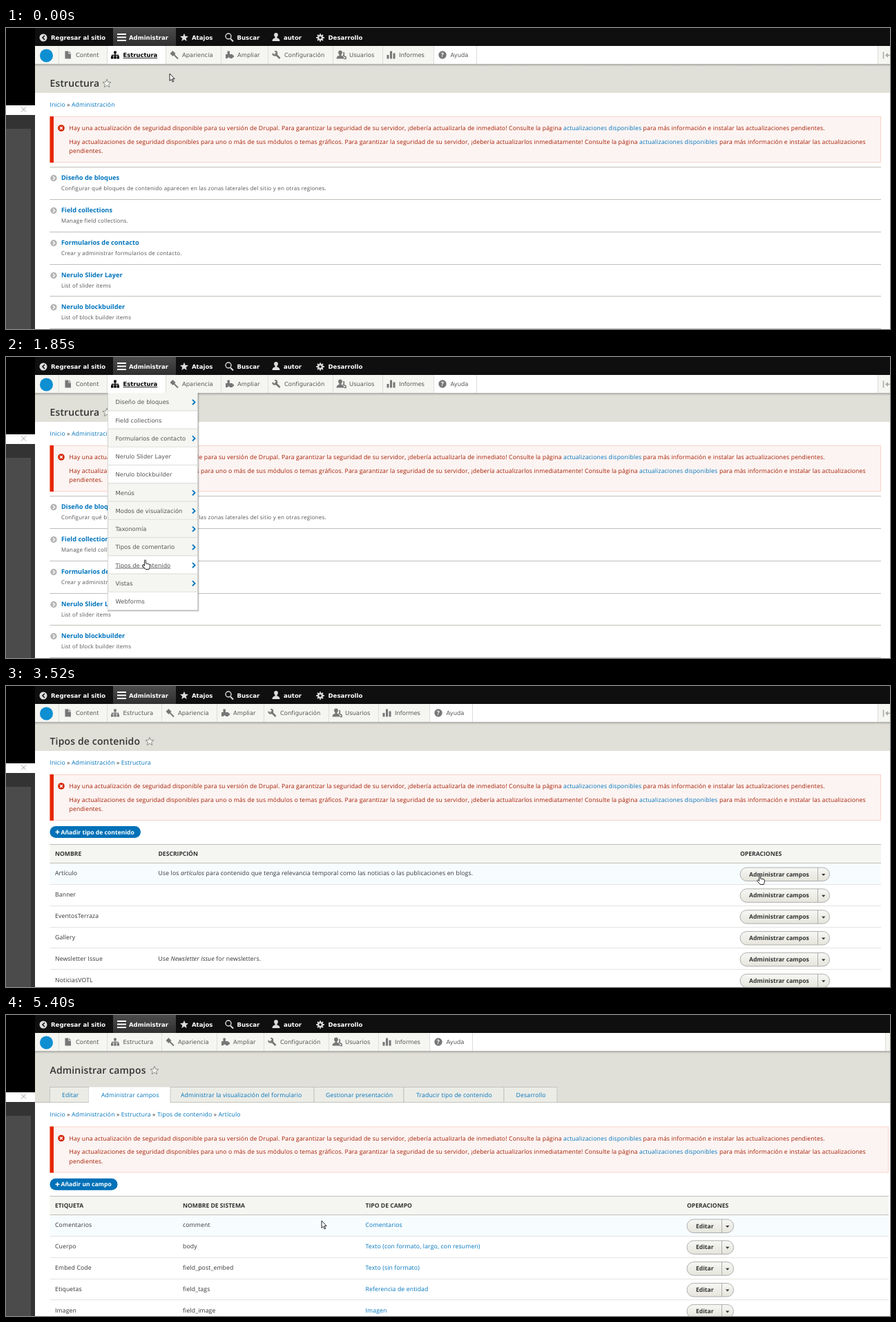
These frames come from a looping animation (1280 by 436 pixels, 5620 ms). An HTML page:

```html
<!DOCTYPE html>
<html lang="es">
<head>
<meta charset="utf-8">
<title>Panel de administración</title>
<style>
html, body { margin: 0; width: 100%; height: 100%; overflow: hidden; background: #fff; }
svg { display: block; text-rendering: geometricPrecision; }
text { font: 8.67px "Open Sans", "Noto Sans", sans-serif; letter-spacing: .135px; fill: #333; white-space: pre; }
.bar { font: bold 8.55px "DejaVu Sans", sans-serif; letter-spacing: 0; fill: #fff; }
.tray { font: 8.42px "DejaVu Sans", sans-serif; letter-spacing: 0; fill: #565656; }
.current { font-weight: bold; fill: #000; text-decoration: underline; }
.title { font-size: 14px; font-weight: 600; letter-spacing: .15px; }
.link { fill: #0074bd; }
.entry { font-size: 9.25px; font-weight: bold; letter-spacing: 0; fill: #0074bd; }
.note { font-size: 8px; letter-spacing: .21px; fill: #555; }
.error { fill: #a51b00; }
.strong { font-size: 8.6px; font-weight: bold; letter-spacing: 0; }
.white { fill: #fff; }
</style>
</head>
<body>
<svg id="stage" width="1280" height="436" viewBox="0 0 1280 436"></svg>
<script>
const LOOP = 5620, ROW = 30.85, ITEM = 26.25;
const BLUE = '#0074bd', PALE = '#f5f5f2', LINE = '#bebfb9', HOVER = '#f7fcff';

const rect = (x, y, w, h, fill, extra = '') =>
  `<rect x="${x}" y="${y}" width="${w}" height="${h}" fill="${fill}" ${extra}/>`;
const text = (x, y, s, cls = '') => `<text x="${x}" y="${y}" class="${cls}">${s}</text>`;
const circle = (x, y, r, fill) => `<circle cx="${x}" cy="${y}" r="${r}" fill="${fill}"/>`;
const stroke = (d, color, w = 1) => `<path d="${d}" fill="none" stroke="${color}" stroke-width="${w}"/>`;
const shape = (d, fill) => `<path d="${d}" fill="${fill}"/>`;
const at = (x, y, s) => `<g transform="translate(${x} ${y})">${s}</g>`;
const link = s => `<tspan class="link">${s}</tspan>`;
const italic = s => `<tspan font-style="italic">${s}</tspan>`;

function star(r, fill, line = 'none') {
  const points = Array.from({ length: 10 }, (_, i) => {
    const a = Math.PI * (i / 5 - .5), k = i % 2 ? r * .45 : r;
    return `${(k * Math.cos(a)).toFixed(2)},${(k * Math.sin(a)).toFixed(2)}`;
  });
  return `<polygon points="${points.join(' ')}" fill="${fill}" stroke="${line}" stroke-width=".8"/>`;
}

// Icons are centred on 0,0.
const person = c => circle(0, -3, 2.9, c) + shape('M-5.5 6Q-5.5 2-1.5 1.5V-1h3v2.5Q5.5 2 5.5 6z', c);
const wrench = c => stroke('M5 5L-2-2', c, 2.6) + stroke('M-5.2-2.2A3 3 0 1 0-2.2-5.2', c, 2);
const gear = stroke('M0-5.8V5.8M-5.8 0H5.8M-4-4L4 4M4-4L-4 4', '#ddd', 1.8) +
  circle(0, 0, 4, '#ddd') + circle(0, 0, 1.8, '#111');
const trayIcons = [
  c => shape('M-4-5.5H1V-1.5H4.5V5.5H-4zM2-5.5L4.5-2.5H2z', c),
  c => stroke('M0-4V4M-4.5 3V.5H4.5V3', c, 1.3) + rect(-1.8, -5.5, 3.6, 3.6, c) +
    [-6, -1.7, 2.6].map(x => rect(x, 2, 3.4, 3.6, c)).join(''),
  c => stroke('M-.5-.5L5.5 5.5', c, 2) + shape('M-6-2L-2-6 2-2-2 2z', c),
  c => rect(-5.5, -1, 10, 6, c) + rect(-3, -5.5, 3.4, 5, c) + circle(5, 2, 1.7, c) + circle(-1, 5, 1.5, '#fff'),
  wrench,
  c => at(-1.5, -.5, person(c)) + stroke('M3-4Q5-2 3 1L6.5 3V5.5H4', c, 1.6),
  c => rect(-6, 0, 3, 5.5, c) + rect(-1.5, -5.5, 3, 11, c) + rect(3, -2.5, 3, 8, c),
  c => circle(0, 0, 5.7, c) + '<text x="-2.3" y="3.2" style="font-weight:bold;fill:#fff">?</text>'
];

function frame() {
  return rect(0, 0, 42, 112, '#000') + rect(0, 112, 42, 14, '#fff') +
    stroke('M22 114.5l7 7m0-7l-7 7', '#888', .8) +
    rect(0, 126, 42, 310, '#333') + rect(0, 146, 36, 290, '#4b4b4b') +
    rect(42, 0, 1238, 26, '#0f0f0f') + rect(155, 0, 91, 26, 'url(#tab)') +
    circle(54, 14, 5.5, '#ddd') + stroke('M56 11l-3 3 3 3', '#111', 1.6) +
    [8, 12.5, 17].map(y => rect(161, y, 13, 2, '#fff')).join('') +
    at(258, 14, star(6.3, '#ddd')) +
    stroke('M325 15.5l4 4', '#ddd', 2) + '<circle cx="322" cy="12" r="4" fill="none" stroke="#ddd" stroke-width="1.4"/>' +
    at(391, 13, person('#ddd')) + at(455, 14, gear) +
    [[65, 'Regresar al sitio'], [178, 'Administrar'], [269, 'Atajos'], [334.5, 'Buscar'],
     [402, 'autor'], [466.5, 'Desarrollo']].map(([x, s]) => text(x, 16.7, s, 'bar')).join('');
}

function tray(page) {
  const labels = ['Content', 'Estructura', 'Apariencia', 'Ampliar', 'Configuración', 'Usuarios', 'Informes', 'Ayuda'];
  const ends = [146, 231, 311, 379, 473, 545, 619, 681];
  const starts = [101, 169.5, 255, 335, 403, 497, 569, 643.5];
  const shift = i => page && i > 0 ? -6 : 0;
  const edge = page === 2 ? 1273 : 1262;
  let s = rect(42, 26, 1238, 26, '#fff') + rect(42, 26, 577 + shift(1), 26, PALE);
  if (!page) s += rect(147, 26, 84, 26, '#fff');
  s += circle(58.5, 40, 9.5, '#0d8fd2') + rect(76, 26, 1, 26, '#ddd');
  labels.forEach((label, i) => {
    const active = !page && i === 1, dx = i > 1 ? shift(i) : 0;
    s += rect(ends[i] + shift(i), 26, 1, 26, '#ddd') +
      at(starts[i] - 11.5 + dx, 39, trayIcons[i](active ? '#000' : '#777')) +
      text(starts[i] + dx, 42.2, label, active ? 'tray current' : 'tray');
  });
  s += rect(edge, 26, 18, 26, PALE) + rect(edge, 26, 1, 26, '#ddd');
  if (page < 2) s += stroke('M1270.5 34.5v10', '#aaa', 1.6) + stroke('M1280 39.5h-4', '#aaa', 1.6) + shape('M1273 39.5l4-3.5v7z', '#aaa');
  return s + rect(42, 52, 1238, 4, 'url(#shade)');
}

function message(top, right) {
  const more = 'actualizaciones disponibles';
  return at(0, top,
    rect(64, .5, right - 64.5, 66, '#fcf4f2', 'stroke="#f9c9bf" stroke-width=".8"') +
    rect(63.5, 0, 5.5, 67, '#e62600') +
    circle(80, 17, 4.8, '#d42200') + stroke('M78 15l4 4m0-4l-4 4', '#fff', 1.4) +
    text(91.5, 20, 'Hay una actualización de seguridad disponible para su versión de Drupal. Para garantizar la seguridad de su servidor, ¡debería actualizarla de inmediato! Consulte la página', 'error') +
    text(807, 20, more, 'link') +
    text(922.5, 20, 'para más información e instalar las actualizaciones pendientes.', 'error') +
    text(91.5, 39.5, 'Hay actualizaciones de seguridad disponibles para uno o más de sus módulos o temas gráficos. Para garantizar la seguridad de su servidor, ¡debería actualizarlos inmediatamente! Consulte la página', 'error') +
    text(917, 39.5, more, 'link') +
    text(1033, 39.5, 'para más información e instalar las actualizaciones', 'error') +
    text(91.5, 53, 'pendientes.', 'error'));
}

function heading(page, title, starX, crumbs) {
  const tall = page === 2;
  return rect(42, 52, 1238, tall ? 75 : 42, '#e0e0d8') + tray(page) +
    text(63.5, 85.3, title, 'title') + at(starX, 80.5, star(6.3, '#f0f0ea', '#777')) +
    text(63.5, tall ? 147 : 113.7, crumbs.map(link).join(' » ')) +
    message(tall ? 161.5 : 128, tall ? 1278 : 1267);
}

function addButton(y, w, label) {
  return rect(63.5, y, w, 17, '#0071b8', 'rx="8.5"') +
    stroke(`M71.5 ${y + 8.5}h6m-3-3v6`, '#fff', 1.6) + text(79.5, y + 11.6, label, 'strong white');
}

function dropButton(x, y, w, label) {
  const split = x + w - 17.5;
  return rect(x, y, w, 19.5, 'url(#button)', 'rx="9.7" stroke="#a6a6a6" stroke-width=".9"') +
    rect(split, y, .9, 19.5, '#a6a6a6') + shape(`M${split + 6} ${y + 9}h5.4l-2.7 3z`, '#333') +
    text(x + 13, y + 12.6, label, 'strong');
}

function table(id, top, right, columns, heads, rows, buttonWidth, buttonLabel) {
  const first = top + 27.5;
  let s = rect(63.5, top, right - 63.5, 27, PALE) + rect(63.5, Math.floor(top), right - 63.5, 1, LINE) +
    `<rect id="${id}" x="63.5" width="${right - 63.5}" height="${ROW - 1}" fill="${HOVER}"/>` +
    rect(63.5, first - 1, right - 63.5, 1, LINE);
  heads.forEach((h, i) => s += text(columns[i], top + 16, h, 'strong'));
  rows.forEach((cells, r) => {
    const y = first + r * ROW;
    s += rect(63.5, Math.round(y + ROW - 1), right - 63.5, 1, '#e3e3e1');
    cells.forEach((c, i) => s += text(columns[i], y + 17.3, c));
    s += dropButton(columns[columns.length - 1], y + 6, buttonWidth, buttonLabel);
  });
  return s;
}

function structurePage() {
  const entries = [
    ['Diseño de bloques', 'Configurar qué bloques de contenido aparecen en las zonas laterales del sitio y en otras regiones.'],
    ['Field collections', 'Manage field collections.'],
    ['Formularios de contacto', 'Crear y administrar formularios de contacto.'],
    ['Nerulo Slider Layer', 'List of slider items'],
    ['Nerulo blockbuilder', 'List of block builder items']
  ];
  return heading(0, 'Estructura', 146, ['Inicio', 'Administración']) +
    entries.map(([name, note], i) => at(0, Math.round(201 + i * 46.85),
      rect(63.5, 0, 1203.5, 1, LINE) + circle(69, 16.5, 4.7, '#b4b4b4') +
      stroke('M68 14l2.5 2.5-2.5 2.5', '#fff', 1.4) +
      text(80, 19.2, name, 'entry') + text(80, 33.8, note, 'note'))).join('') +
    rect(63.5, 435, 1203.5, 1, LINE);
}

function typesPage() {
  return heading(1, 'Tipos de contenido', 208, ['Inicio', 'Administración', 'Estructura']) +
    addButton(203, 131.5, 'Añadir tipo de contenido') +
    table('typeRow', 229.5, 1267, [71, 220.5, 1063], ['NOMBRE', 'DESCRIPCIÓN', 'OPERACIONES'], [
      ['Artículo', `Use los ${italic('artículos')} para contenido que tenga relevancia temporal como las noticias o las publicaciones en blogs.`],
      ['Banner'], ['EventosTerraza'], ['Gallery'],
      ['Newsletter Issue', `Use ${italic('Newsletter Issue')} for newsletters.`],
      ['NoticiasVOTL']
    ], 129.5, 'Administrar campos');
}

function fieldsPage() {
  const tabs = [[63.5, 81, 'Editar'], [120, 138, 'Administrar campos'], [238, 253, 'Administrar la visualización del formulario'],
    [446, 463, 'Gestionar presentación'], [576, 594, 'Traducir tipo de contenido'], [721, 738.5, 'Desarrollo'], [798]];
  let s = heading(2, 'Administrar campos', 215, ['Inicio', 'Administración', 'Estructura', 'Tipos de contenido', 'Artículo']) +
    rect(42, 126, 1238, 1, LINE);
  tabs.slice(0, -1).forEach(([x, tx, label], i) => {
    const active = i === 1;
    s += rect(x, 104.5, tabs[i + 1][0] - x, active ? 23 : 22, active ? '#fff' : '#ecece6', active ? '' : `stroke="${LINE}" stroke-width=".8"`) +
      text(tx, 118.8, label, 'link');
  });
  return s + addButton(236.7, 98, 'Añadir un campo') +
    table('fieldRow', 262.5, 1278, [71, 256, 520.5, 986], ['ETIQUETA', 'NOMBRE DE SISTEMA', 'TIPO DE CAMPO', 'OPERACIONES'], [
      ['Comentarios', 'comment', link('Comentarios')],
      ['Cuerpo', 'body', link('Texto (con formato, largo, con resumen)')],
      ['Embed Code', 'field_post_embed', link('Texto (sin formato)')],
      ['Etiquetas', 'field_tags', link('Referencia de entidad')],
      ['Imagen', 'field_image', link('Imagen')]
    ], 67.5, 'Editar');
}

const menuItems = ['Diseño de bloques', 'Field collections', 'Formularios de contacto', 'Nerulo Slider Layer',
  'Nerulo blockbuilder', 'Menús', 'Modos de visualización', 'Taxonomía', 'Tipos de comentario',
  'Tipos de contenido', 'Vistas', 'Webforms'];
const hasChildren = i => ![1, 3, 4, 11].includes(i);

function menu() {
  return rect(147, 52, 132.5, 316.5, '#000', 'opacity=".18"') + rect(147, 52, 131.3, 315.5, '#aaa') +
    menuItems.map((label, i) => at(0, 52 + i * ITEM,
      rect(147.5, 0, 130, ITEM, '#fff', 'class="itemBack"') + rect(147.5, ITEM - 1, 130, 1, '#ddd') +
      (hasChildren(i) ? stroke('M270 9.8l3.6 3.6-3.6 3.6', BLUE, 1.8) : '') +
      text(158.5, 16.4, label, 'tray item'))).join('');
}

const gradient = (id, a, b) => `<linearGradient id="${id}" x2="0" y2="1"><stop stop-color="${a}"/><stop offset="1" stop-color="${b}"/></linearGradient>`;
const $ = id => document.getElementById(id);

$('stage').innerHTML =
  `<defs>${gradient('tab', '#4b4b4b', '#303030')}${gradient('button', '#f7f7f4', '#e5e5dc')}${gradient('shade', '#aaaaa4', '#e0e0d8')}</defs>` +
  rect(0, 0, 1280, 436, '#fff') + frame() +
  [structurePage, typesPage, fieldsPage].map((build, i) => `<g id="page${i}">${build()}</g>`).join('') +
  `<g id="menu">${menu()}</g>
  <g stroke="#111" stroke-width=".9" fill="#fff" stroke-linejoin="round">
    <path id="arrow" d="M0 0V10.5L2.5 8.2 4.2 12 5.8 11.3 4.1 7.6H7.2z"/>
    <path id="hand" d="M-1 1C-1-.4 1-.4 1 1V5L5.5 6Q7.2 6.4 7 8.2L6.4 11.3 5.5 13.5H.5L-3.6 8.6C-4.2 7.4-2.9 6.7-2.2 7.3L-1 8.4z"/>
  </g>`;

const itemBacks = [...document.querySelectorAll('.itemBack')];
const itemLabels = [...document.querySelectorAll('.item')];

// Pointer path: step, x, y. The screen refreshes once per 110 ms step.
const path = [[0, 237, 66], [4, 217, 48], [8, 217, 48], [9, 215.5, 55], [14, 210, 224], [17, 201.5, 294], [19, 200, 296],
  [20, 260, 300], [23, 735, 331], [25, 957, 321], [26, 970, 317], [31, 1089, 272], [32, 1091.5, 274], [34, 1091.5, 274],
  [36, 1060, 276], [37, 1000, 271], [38, 945.5, 265.5], [43, 592, 279], [44, 560, 284], [49, 457, 298], [60, 457, 298]];

function pointer(step) {
  const i = path.findIndex(p => p[0] > step);
  const [s0, x0, y0] = path[i - 1], [s1, x1, y1] = path[i];
  const k = (step - s0) / (s1 - s0);
  return [x0 + (x1 - x0) * k, y0 + (y1 - y0) * k];
}

const show = (id, on) => $(id).setAttribute('display', on ? 'inline' : 'none');

function hoverRow(id, first, y) {
  const row = Math.floor((y - first) / ROW);
  show(id, row >= 0);
  $(id).setAttribute('y', first + row * ROW);
}

function draw() {
  const step = Math.floor((performance.now() % LOOP + 20) / 110);
  const [x, y] = pointer(step);
  const page = step < 18 ? 0 : step < 35 ? 1 : 2;
  const menuOpen = page === 0 && step >= 2;
  const onButton = page === 1 && x > 1063 && y < 283;

  for (let i = 0; i < 3; i++) show('page' + i, i === page);
  show('menu', menuOpen);
  const hovered = Math.floor((y - 52) / ITEM);
  menuItems.forEach((_, i) => {
    itemBacks[i].setAttribute('fill', hasChildren(i) && i !== hovered ? PALE : '#fff');
    itemLabels[i].style.textDecoration = i === hovered ? 'underline' : 'none';
  });
  if (page === 1) hoverRow('typeRow', 257, y);
  if (page === 2) hoverRow('fieldRow', 290, y);

  const hand = menuOpen || onButton;
  show('hand', hand);
  show('arrow', !hand);
  $(hand ? 'hand' : 'arrow').setAttribute('transform', `translate(${x} ${y})`);
  requestAnimationFrame(draw);
}
draw();
</script>
</body>
</html>
```
